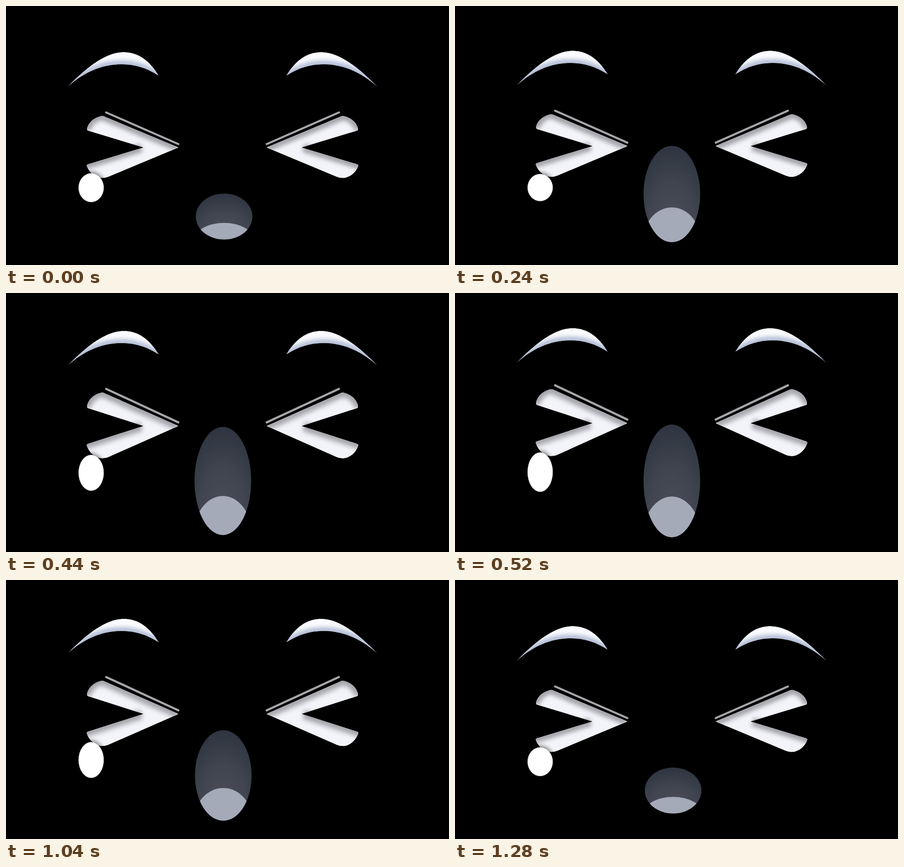
These frames come from a looping animation (978 by 573 pixels, 1.6 s). An HTML page:

```html
<!DOCTYPE html>
<html lang="en">
<head>
<meta charset="utf-8">
<title>Yawning face</title>
<style>
  html, body { margin: 0; width: 100%; height: 100%; overflow: hidden; background: #000; }
  svg { display: block; width: 100%; height: 100%; }
</style>
</head>
<body>
<svg viewBox="0 0 978 573">
  <defs>
    <filter id="soft" filterUnits="userSpaceOnUse" x="100" y="60" width="320" height="420">
      <feGaussianBlur stdDeviation="5"/>
    </filter>
    <radialGradient id="throat" cx=".5" cy=".8" r=".82">
      <stop offset="0" stop-color="#4d4d5b"/>
      <stop offset=".5" stop-color="#40454f"/>
      <stop offset="1" stop-color="#2d343f"/>
    </radialGradient>
    <path id="browShape" d="M136 179C185 128 225 102 260 102C293 102 318 122 337 154C310 137 285 129 255 129C210 129 170 148 136 179Z"/>
    <path id="eyeShape" d="M181 276Q178 275 179 270C183 255 197 246 212 243Q215 243 219 245L379 312Q381 313 379 314L226 378Q216 382 206 380C192 376 182 366 178 353Q178 351 181 350L303 313Z"/>
    <clipPath id="browClip"><use href="#browShape"/></clipPath>
    <clipPath id="eyeClip"><use href="#eyeShape"/></clipPath>
    <clipPath id="mouthClip"><circle r="1"/></clipPath>
  </defs>

  <g id="half" fill="none">
    <g id="brow">
      <g clip-path="url(#browClip)">
        <use href="#browShape" fill="#fafbfe"/>
        <path d="M345 159C310 137 285 129 255 129C210 129 170 148 136 179" stroke="#b4bed6" stroke-width="17" filter="url(#soft)"/>
      </g>
    </g>
    <g id="eye">
      <g clip-path="url(#eyeClip)">
        <use href="#eyeShape" fill="#f3f4f9"/>
        <path d="M177 274C183 255 197 246 212 243L380 313M172 353L299 314" stroke="#a4a4ab" stroke-width="19" filter="url(#soft)"/>
      </g>
      <path d="M221 235.5L380.5 305.5" stroke="#a6a6ab" stroke-width="4.5" stroke-linecap="round"/>
    </g>
  </g>
  <use href="#half" transform="matrix(-1 0 0 1 956 0)"/>

  <ellipse id="shade" cx="188" rx="31" opacity=".5" filter="url(#soft)"/>
  <ellipse id="tear" cx="188" rx="27.7" fill="#fff" stroke="#c4c6ca" stroke-width=".7"/>

  <g id="mouth">
    <circle r="1" fill="url(#throat)"/>
    <g clip-path="url(#mouthClip)">
      <ellipse cy="1.034" rx="1.05" ry=".757" fill="#a4aab8"/>
    </g>
  </g>
</svg>
<script>
  const LOOP = 1600, STEP = 40;
  const $ = id => document.getElementById(id);
  const mix = (a, b, p) => a + (b - a) * p;

  // lift: brows and eyes; mouth and tear: top and bottom edges
  const rest = { lift: 0, mouthX: 481.5, mouthTop: 415, mouthEnd: 516.5, tearTop: 370, tearEnd: 434 };
  const open = { lift: 0, mouthX: 478.7, mouthTop: 312, mouthEnd: 520, tearTop: 374.2, tearEnd: 430.6 };
  const wide = { lift: 1, mouthX: 478.7, mouthTop: 291, mouthEnd: 540.5, tearTop: 352.5, tearEnd: 440 };
  const keys = [[0, rest], [200, open], [520, wide], [920, wide], [1280, rest], [LOOP, rest]];

  function poseAt(t) {
    const i = keys.findIndex(k => t < k[0]);
    const [t0, a] = keys[i - 1], [t1, b] = keys[i];
    const p = (t - t0) / (t1 - t0), pose = {};
    for (const k in a) pose[k] = mix(a[k], b[k], p);
    return pose;
  }

  function draw(t) {
    const s = poseAt(t);
    $('brow').setAttribute('transform', `translate(0 ${-24.3 * s.lift})`);
    $('eye').setAttribute('transform',
      `translate(0 ${313 - 25 * s.lift}) scale(1 ${1 + .08 * s.lift}) translate(0 -313)`);

    const tearY = (s.tearTop + s.tearEnd) / 2, tearR = (s.tearEnd - s.tearTop) / 2;
    for (const [id, grow] of [['shade', 3], ['tear', -.3]]) {
      $(id).setAttribute('cy', tearY);
      $(id).setAttribute('ry', tearR + grow);
    }

    const mouthY = (s.mouthTop + s.mouthEnd) / 2, mouthR = (s.mouthEnd - s.mouthTop) / 2;
    $('mouth').setAttribute('transform', `translate(${s.mouthX} ${mouthY}) scale(62.5 ${mouthR})`);
  }

  const start = performance.now();
  function tick() {
    const t = (performance.now() - start) % LOOP;
    draw(Math.floor(t / STEP) * STEP);
    requestAnimationFrame(tick);
  }
  tick();
</script>
</body>
</html>
```
